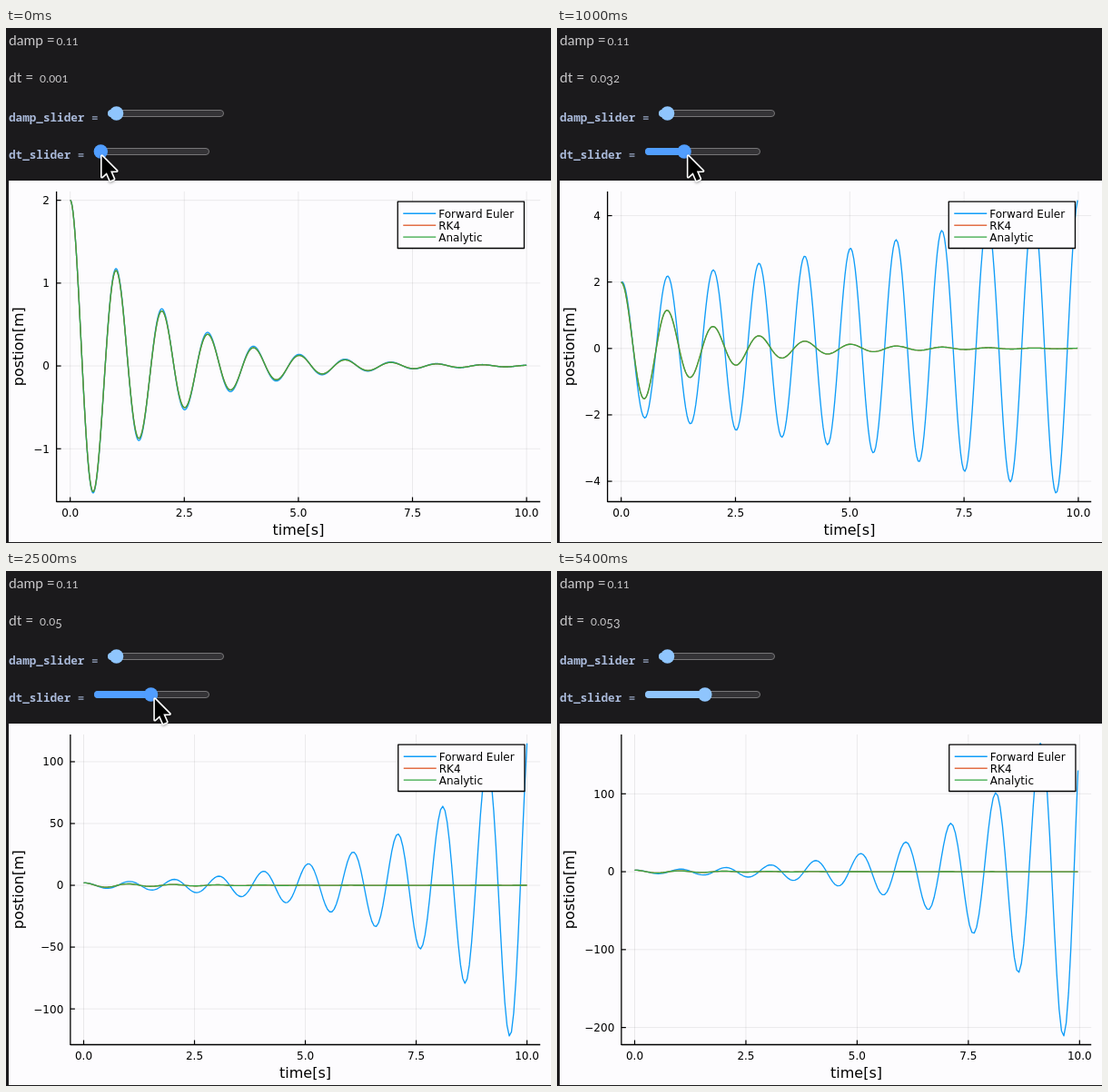
Write an HTML page with a canvas that moves like this. It is 600 px wide and 567 px high and loops after 5.5 s.

```html
<!DOCTYPE html>
<html lang="en">
<head>
<meta charset="utf-8">
<title>Damped oscillator solvers</title>
<style>
html, body { margin: 0; width: 100%; height: 100%; overflow: hidden; background: #1b1a1c; }
canvas { display: block; }
</style>
</head>
<body>
<canvas id="stage" width="600" height="567"></canvas>
<script>
const ctx = document.getElementById('stage').getContext('2d');
const LOOP = 5500, STEP = 100;
const SANS = '"DejaVu Sans", sans-serif';
const BLUE = '#109df8', ORANGE = '#e26f46', GREEN = '#36a743';
const IDLE = '#8fc5fd', ACTIVE = '#519eff', HOVER = '#cfe6fa';

const GAMMA = 0.55, OMEGA = 2 * Math.PI, X0 = 2, T_END = 10;
const TOP = 180, BOTTOM = 521.5, RIGHT = 588.2;

// time in ms, value
const DT_KEYS = [[0, .001], [500, .016], [1000, .032], [1500, .041], [2500, .05], [4200, .053]];
const EXIT_KEYS_X = [[4400, 0], [4500, 14], [4600, 34]];
const EXIT_KEYS_Y = [[4400, 140], [4500, 86], [4600, 26]];

function lerpKeys(keys, t) {
  if (t <= keys[0][0]) return keys[0][1];
  for (let i = 1; i < keys.length; i++) {
    const [t0, a] = keys[i - 1], [t1, b] = keys[i];
    if (t <= t1) return a + (b - a) * (t - t0) / (t1 - t0);
  }
  return keys[keys.length - 1][1];
}

// --- solvers ---
const accel = (x, v) => -OMEGA * OMEGA * x - 2 * GAMMA * v;

function eulerStep(x, v, h) {
  return [x + h * v, v + h * accel(x, v)];
}

function rk4Step(x, v, h) {
  const a1 = accel(x, v);
  const v2 = v + h / 2 * a1, a2 = accel(x + h / 2 * v, v2);
  const v3 = v + h / 2 * a2, a3 = accel(x + h / 2 * v2, v3);
  const v4 = v + h * a3, a4 = accel(x + h * v3, v4);
  return [x + h / 6 * (v + 2 * v2 + 2 * v3 + v4), v + h / 6 * (a1 + 2 * a2 + 2 * a3 + a4)];
}

function integrate(step, h, n) {
  const out = [X0];
  let x = X0, v = 0;
  for (let i = 0; i < n; i++) {
    [x, v] = step(x, v, h);
    out.push(x);
  }
  return out;
}

function analytic(h, n) {
  const w = Math.sqrt(OMEGA * OMEGA - GAMMA * GAMMA);
  return Array.from({ length: n + 1 }, (_, i) => {
    const t = i * h;
    return X0 * Math.exp(-GAMMA * t) * (Math.cos(w * t) + GAMMA / w * Math.sin(w * t));
  });
}

// --- drawing helpers ---
function text(str, x, y, font, color, align = 'left', base = 'alphabetic') {
  ctx.font = font;
  ctx.fillStyle = color;
  ctx.textAlign = align;
  ctx.textBaseline = base;
  ctx.fillText(str, x, y);
}

function line(x0, y0, x1, y1, color, width) {
  ctx.strokeStyle = color;
  ctx.lineWidth = width;
  ctx.beginPath();
  ctx.moveTo(x0, y0);
  ctx.lineTo(x1, y1);
  ctx.stroke();
}

// Old-style figures: 0-2 at x-height, odd ones and 4 hang below the line.
function oldStyleNumber(str, x, y, color) {
  for (const c of str) {
    const small = '012.'.includes(c);
    const font = `${small ? 12 : 13}px Lato, sans-serif`;
    text(c, x, '34579'.includes(c) ? y + 3 : y, font, color);
    x += ctx.measureText(c).width + 0.2;
  }
}

function readout(name, value, valueX, y) {
  const color = '#cbcacc';
  text(name + ' =', 3, y, '15.5px Lato, sans-serif', color);
  oldStyleNumber(String(value), valueX, y, color);
}

function sliderLabel(name, y) {
  const font = 'bold 12.65px "Noto Sans Mono", "DejaVu Sans Mono", monospace';
  text(name, 3, y, font, '#a9b9d9');
  text('=', 3 + ctx.measureText(name + ' ').width, y, font, '#7f8ba3');
}

function slider(x0, x1, y, thumb, color) {
  ctx.beginPath();
  ctx.roundRect(x0 + .5, y - 3.5, x1 - x0 - 1, 7, 3.5);
  ctx.fillStyle = '#343336';
  ctx.fill();
  ctx.strokeStyle = '#777678';
  ctx.lineWidth = 1;
  ctx.stroke();
  ctx.fillStyle = color;
  ctx.beginPath();
  ctx.roundRect(x0, y - 4, thumb - x0, 8, 4);
  ctx.fill();
  ctx.beginPath();
  ctx.arc(thumb, y, 7.7, 0, 2 * Math.PI);
  ctx.fill();
}

function cursor(x, y) {
  ctx.save();
  ctx.translate(x, y);
  ctx.beginPath();
  [[1, 1], [1, 24], [6.3, 19.2], [10.2, 28], [14.2, 26.2], [10.4, 17.6], [17.4, 17.4]]
    .forEach(([px, py]) => ctx.lineTo(px, py));
  ctx.closePath();
  ctx.shadowColor = 'rgba(0,0,0,.4)';
  ctx.shadowBlur = 3;
  ctx.shadowOffsetY = 1;
  ctx.lineJoin = 'round';
  ctx.strokeStyle = '#fff';
  ctx.lineWidth = 3.2;
  ctx.stroke();
  ctx.shadowColor = 'transparent';
  ctx.fillStyle = '#000';
  ctx.fill();
  ctx.restore();
}

// --- chart ---
function niceTicks(lo, hi) {
  const power = Math.floor(Math.log10(hi - lo));
  for (const scale of [10 ** power, 10 ** (power - 1)]) {
    for (const m of [5, 2.5, 2, 1]) {
      const step = m * scale;
      const first = Math.ceil(lo / step), last = Math.floor(hi / step);
      if (last - first < 3) continue;
      const digits = Number.isInteger(step) ? 0 : 1;
      return Array.from({ length: last - first + 1 }, (_, i) => {
        const value = (first + i) * step;
        return { value, label: value.toFixed(digits).replace('-', '\u2212') };
      });
    }
  }
  return [];
}

function legend(left) {
  const right = RIGHT - (RIGHT - left) / 30;
  const x = right - 139.2;
  ctx.fillStyle = '#fdfcfe';
  ctx.fillRect(x, 191.2, 139.2, 51.3);
  ctx.strokeStyle = '#000';
  ctx.lineWidth = 1.3;
  ctx.strokeRect(x, 191.2, 139.2, 51.3);
  [['Forward Euler', BLUE], ['RK4', ORANGE], ['Analytic', GREEN]].forEach(([name, color], i) => {
    const y = 204.3 + i * 12.9;
    line(x + 6, y, x + 42, y, color, 1.4);
    text(name, right - 94.2, y + 4.4, '12px ' + SANS, '#000');
  });
}

function chart(dt) {
  const n = Math.floor(T_END / dt + 1e-6), tMax = n * dt;
  const euler = integrate(eulerStep, dt, n);
  const lo = Math.min(...euler, -1.52), hi = Math.max(...euler);
  const pad = (hi - lo) * .03;
  const ticks = niceTicks(lo - pad, hi + pad);

  ctx.fillStyle = '#fdfcfe';
  ctx.fillRect(3, 168, 597, 398);

  const tickFont = '12px ' + SANS;
  ctx.font = tickFont;
  const labelWidth = Math.max(...ticks.map(k => ctx.measureText(k.label).width));
  const left = 55.6 + labelWidth - ctx.measureText('\u22121').width;
  const px = t => left + (t / tMax + .03) / 1.06 * (RIGHT - left);
  const py = v => BOTTOM - (v - lo + pad) / (hi - lo + 2 * pad) * (BOTTOM - TOP);
  const grid = 'rgba(0,0,0,.075)';

  for (let t = 0; t <= T_END; t += 2.5) {
    const x = px(t);
    line(x, TOP, x, BOTTOM, grid, 1);
    line(x, BOTTOM, x, BOTTOM - 5, '#000', 1.2);
    text(t.toFixed(1), x, 538.2, tickFont, '#000', 'center');
  }
  for (const { value, label } of ticks) {
    const y = py(value);
    line(left, y, RIGHT, y, grid, 1);
    line(left, y, left + 5, y, '#000', 1.2);
    text(label, left - 7.6, y + 4.4, tickFont, '#000', 'right');
  }
  line(left, TOP, left, BOTTOM + .6, '#000', 1.3);
  line(left, BOTTOM, RIGHT, BOTTOM, '#000', 1.3);

  const titleFont = '16px ' + SANS;
  text('time[s]', (left + RIGHT) / 2, 557.5, titleFont, '#000', 'center');
  ctx.save();
  ctx.translate(19, (TOP + BOTTOM) / 2);
  ctx.rotate(-Math.PI / 2);
  text('postion[m]', 0, 0, titleFont, '#000', 'center');
  ctx.restore();

  const curves = [[euler, BLUE], [integrate(rk4Step, dt, n), ORANGE], [analytic(dt, n), GREEN]];
  ctx.lineJoin = 'round';
  for (const [values, color] of curves) {
    ctx.beginPath();
    values.forEach((v, i) => ctx.lineTo(px(i * dt), py(v)));
    ctx.strokeStyle = color;
    ctx.lineWidth = 1.35;
    ctx.stroke();
  }
  legend(left);
}

function draw(t) {
  const dt = Math.round(lerpKeys(DT_KEYS, t) * 1000) / 1000;
  // The thumb runs slightly ahead of the recomputed plot.
  const thumbDt = lerpKeys(DT_KEYS, t + Math.min(45, t));
  const thumb = 104.3 + (thumbDt - .001) / .099 * 111.5;

  ctx.fillStyle = '#1b1a1c';
  ctx.fillRect(0, 0, 600, 567);
  readout('damp', 0.11, 55.5, 18.7);
  readout('dt', dt, 37, 59.7);
  sliderLabel('damp_slider', 102.5);
  sliderLabel('dt_slider', 144.3);
  slider(112, 240, 94, 121.6, IDLE);
  slider(97, 224, 136, thumb, t < 4300 ? ACTIVE : t <= 4400 ? HOVER : IDLE);
  chart(dt);

  if (t <= 4600) {
    const grip = .3 + 3 * Math.min(1, t / 300);
    cursor(thumb + grip + lerpKeys(EXIT_KEYS_X, t), lerpKeys(EXIT_KEYS_Y, t));
  }
}

let shown = -1;
function tick() {
  const t = Math.floor(performance.now() % LOOP / STEP) * STEP;
  if (t !== shown) draw(shown = t);
  requestAnimationFrame(tick);
}
tick();
</script>
</body>
</html>
```
